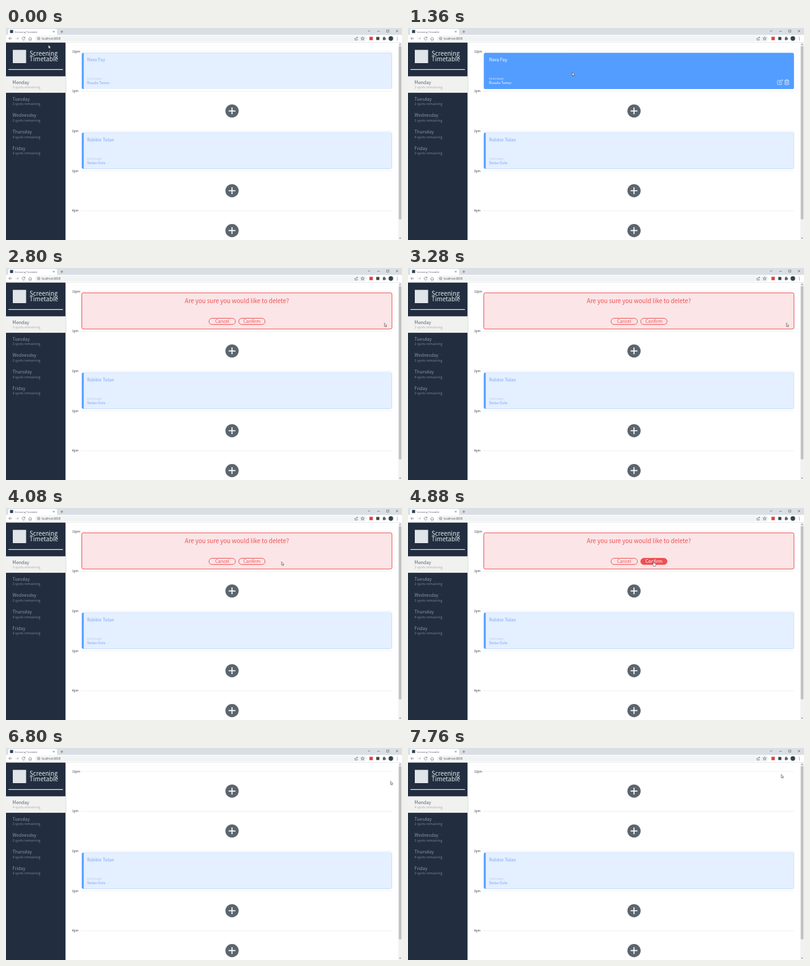
Write an HTML page that moves like this. It is 640 px wide and 344 px high and loops after 7.84 s.

```html
<!DOCTYPE html>
<html lang="en">
<head>
<meta charset="utf-8">
<title>Screening Timetable</title>
<style>
html, body { margin: 0; width: 100%; height: 100%; overflow: hidden; background: #fff; }
svg { display: block; width: 100vw; height: 100vh; }
text { font-family: "Noto Sans CJK JP", "Noto Sans CJK SC", "Noto Sans CJK", Lato, sans-serif; white-space: pre; }
.ui text { font-family: "Open Sans", "Noto Sans", sans-serif; }
.line { fill: none; stroke: #5f6368; stroke-width: .7; }
</style>
</head>
<body>
<svg id="stage" viewBox="0 0 640 344"></svg>
<script>
const LOOP = 7840, STEP = 80;
const CLICK_TRASH = 2800, CLICK_CONFIRM = 5120, DELETED = 6800;
const NAVY = '#222e3f', RED = '#ee5053';

const text = (x, y, size, fill, str, more = '') =>
  `<text x="${x}" y="${y}" font-size="${size}" fill="${fill}" ${more}>${str}</text>`;
const rect = (x, y, w, h, fill, more = '') =>
  `<rect x="${x}" y="${y}" width="${w}" height="${h}" fill="${fill}" ${more}/>`;
const path = (d, more = 'class="line"') => `<path d="${d}" ${more}/>`;
const group = (id, body) => `<g id="${id}">${body}</g>`;
const rowY = i => 37.9 + i * 64.7;
const centered = 'text-anchor="middle"';

function browser() {
  return `<g class="ui">` +
    rect(0, 0, 640, 11.5, '#dadfe5') +
    path('M1.5 11.5Q3.5 11.5 3.5 9V3.5Q3.5 1.5 5.5 1.5H80.5Q82.5 1.5 82.5 3.5V9Q82.5 11.5 84.5 11.5Z', 'fill="#fff"') +
    rect(6.5, 3.2, 5, 5, '#2c4450') +
    text(14, 7.6, 3.9, '#5a5d61', 'Screening Timetable') +
    path('M75.8 4.4l2.8 2.8m0-2.8l-2.8 2.8M88 6h4.4M90.2 3.8v4.4') +
    path('M585 4l1.8 1.8L588.6 4M600 5.3h4M615.3 3.3h3.4v3.4h-3.4zM630.2 3.2l3.6 3.6m0-3.6l-3.6 3.6') +
    rect(0, 11.5, 640, 12, '#fff') +
    rect(47, 12.4, 536, 9.6, '#f1f3f4', 'rx="4.8"') +
    path('M9.8 17H4.6M7 14.6L4.6 17L7 19.4') +
    path('M15.4 17h5.2m-2.4-2.4L20.6 17l-2.4 2.4', 'class="line" opacity=".5"') +
    path('M30.2 15.4a2.4 2.4 0 1 0 .6 2.2M30.8 14.2v1.8h-1.8') +
    path('M36.4 17.2L39 14.8l2.6 2.4M37.2 17v2.6h3.6V17') +
    path('M50.8 17a2 2 0 1 0 4 0a2 2 0 1 0-4 0M52.8 16.8v1.2', 'class="line" stroke-width=".5"') +
    text(57.5, 18.8, 4.6, '#515559', 'localhost:8000') +
    path('M564 16v3.4h4V18M565.4 17.6q.4-2.4 2.8-2.2m-1.2-1.2l1.4 1.2l-1.4 1.2') +
    path('M576.4 14.3l.8 1.9 2 .1-1.6 1.3.6 2-1.8-1.1-1.8 1.1.6-2-1.6-1.3 2-.1z') +
    rect(587.4, 14.3, 5.4, 5.4, '#e23b3b') +
    rect(598.4, 14.5, 5, 5, '#3c4043') +
    rect(609, 15.4, 4.2, 4.2, '#5f6368') +
    '<circle cx="611.1" cy="15.2" r="1.1" fill="#5f6368"/><circle cx="613.3" cy="17.5" r="1.1" fill="#5f6368"/>' +
    '<circle cx="622" cy="17" r="3.7" fill="#2f4548"/>' +
    [14.8, 17, 19.2].map(y => `<circle cx="632.4" cy="${y}" r=".6" fill="#5f6368"/>`).join('') +
    rect(0, 23, 640, .7, '#e0e2e5') + '</g>';
}

function sidebar() {
  const days = [['Monday', 3], ['Tuesday', 2], ['Wednesday', 2], ['Thursday', 4], ['Friday', 3]];
  return rect(96, 23.7, 1.4, 321, '#d2d6da') +
    rect(0, 23.7, 96, 321, NAVY) +
    rect(11, 35.5, 21.5, 21.5, '#dfe5e8') +
    text(38, 45.3, 9.8, '#e6e9ed', 'Screening', 'font-weight="300"') +
    text(38, 54.4, 9.8, '#e6e9ed', 'Timetable', 'font-weight="300"') +
    rect(4, 66.8, 88, 1.2, '#eef0f2') +
    rect(0, 78.4, 96.6, 26.7, '#f1f1f0') +
    days.map(([day, spots], i) => {
      const y = 91 + i * 26.7;
      return text(10.6, y, 7.15, i ? '#8496aa' : '#59636f', day) +
        text(10.6, y + 7.4, 5.45, i ? '#73859a' : '#b0aeab', `${spots} spots remaining`,
          `font-weight="300" ${i ? '' : 'id="spots"'}`);
    }).join('');
}

function hours() {
  return ['12pm', '1pm', '2pm', '3pm', '4pm'].map((hour, i) =>
    rect(121, rowY(i) - .4, 503, .8, '#ededed') +
    text(106.8, rowY(i) + 1.6, 4.85, '#333', hour, 'font-weight="500"')).join('');
}

function addButton(i) {
  const y = rowY(i) + 32;
  return `<circle cx="365.3" cy="${y}" r="10.7" fill="#5c656d"/>` +
    path(`M359.8 ${y}h11M365.3 ${y - 5.5}v11`, 'stroke="#fff" stroke-width="1.7"');
}

const card = (i, fill, more = '') => rect(122.5, rowY(i) + 2.4, 501.3, 58.7, fill, `rx="2.6" ${more}`);

function appointment(i, name, host, active) {
  const y = rowY(i), blue = '#529dff';
  const icons = path(
    `M602.5 ${y + 47.2}H598.2Q597.2 ${y + 47.2} 597.2 ${y + 48.2}V${y + 53}Q597.2 ${y + 54} 598.2 ${y + 54}H603Q604 ${y + 54} 604 ${y + 53}V${y + 51}` +
    `M600.2 ${y + 51.4}l.4-1.7l4-4l1.3 1.3l-4 4z` +
    `M608.4 ${y + 47.4}h7.6M610.8 ${y + 47.2}v-1.2h2.8v1.2M609.3 ${y + 47.5}v6.5h5.8v-6.5M611.2 ${y + 49}v3.5M613.2 ${y + 49}v3.5`,
    'fill="none" stroke="#e6f1ff" stroke-width=".8"');
  return card(i, blue) +
    (active ? icons : path(`M125.6 ${y + 2.4}H621.2Q623.8 ${y + 2.4} 623.8 ${y + 5}V${y + 58.5}Q623.8 ${y + 61.1} 621.2 ${y + 61.1}H125.6Z`, 'fill="#e4efff"')) +
    text(131, y + 16.4, 7.15, active ? '#fff' : '#7ba7fa', name) +
    text(131, y + 46.2, 4.5, active ? '#d3e6ff' : '#b4cbf8', 'Interviewer') +
    text(131, y + 53.3, 5.5, active ? '#fff' : '#6f9ff8', host);
}

function confirmCard() {
  const pill = (x, label, id = '') =>
    `<g ${id}>` + rect(x, 81.6, 42.6, 10.1, 'none', `rx="5.05" stroke="${RED}" stroke-width="1"`) +
    text(x + 21.3, 89.4, 7.3, RED, label, centered) + '</g>';
  return card(0, '#fbe5e7', `stroke="${RED}" stroke-width="1"`) +
    text(373.2, 57.2, 9.65, RED, 'Are you sure you would like to delete?', `${centered} font-weight="500"`) +
    pill(328.1, 'Cancel') + pill(376.1, 'Confirm', 'id="confirm"');
}

function deletingCard() {
  return card(0, NAVY) +
    '<circle cx="348.6" cy="69.6" r="7.5" fill="none" stroke="#4b5664" stroke-width="1.3"/>' +
    path('M341.1 69.6A7.5 7.5 0 0 1 348.6 62.1', 'id="arc" fill="none" stroke="#fff" stroke-width="1.4"') +
    text(367, 73.4, 9.5, '#fff', 'Deleting', 'font-weight="600"');
}

const scrollbar = () => rect(634, 23.7, 6, 321, '#f1f1f1') + rect(634.8, 29.5, 4.2, 281, '#c1c1c1') +
  path('M635.4 27.3l1.6-1.8l1.6 1.8zM635.4 340.3l1.6 1.8l1.6-1.8z', 'fill="#777"');

const pointer = 'stroke="#333" stroke-width=".55" stroke-linejoin="round" fill="#fff"';

const $ = id => document.getElementById(id);
$('stage').innerHTML = rect(0, 0, 640, 344, '#fff') + browser() + sidebar() + hours() +
  [1, 3, 4].map(addButton).join('') + appointment(2, 'Robbie Tolan', 'Stefan Gohr', false) +
  group('idle', appointment(0, 'Nora Fay', 'Rosalie Temur', false)) +
  group('hover', appointment(0, 'Nora Fay', 'Rosalie Temur', true)) +
  group('ask', confirmCard()) + group('busy', deletingCard()) + group('empty', addButton(0)) +
  scrollbar() +
  group('cursor',
    path('M0 0V5.6L1.3 4.5L2.2 6.5L3.1 6.1L2.2 4.1H4Z', `id="arrow" ${pointer}`) +
    path('M-.6 .3Q0-.4 .6 .3V2.8L3.2 3.3Q4 3.6 3.9 4.4L3.3 7.8H-.1L-2 5.1Q-2.2 4.2-1.3 4.4L-.6 5Z', `id="hand" ${pointer}`));

// Pointer stops: time, x, y
const stops = [
  [0, 68.6, 27.6], [240, 68.6, 27.6], [1360, 265.5, 72], [1840, 629, 90], [2080, 617.3, 87.5],
  [2400, 611.6, 89.3], [3360, 611.6, 89.3], [4400, 396.8, 86.5], [5280, 396.8, 86.5],
  [6160, 538.3, 68], [6960, 631, 52], [7760, 603.2, 42.8], [LOOP, 603.2, 42.8]
];

function pointerAt(t) {
  const i = stops.findIndex(s => s[0] > t);
  const [t0, x0, y0] = stops[i - 1], [t1, x1, y1] = stops[i];
  const u = (t - t0) / (t1 - t0), k = u * u * (3 - 2 * u);
  return [x0 + (x1 - x0) * k, y0 + (y1 - y0) * k];
}

function render(t) {
  const [x, y] = pointerAt(t);
  const over = (l, top, r, b) => x >= l && x <= r && y >= top && y <= b;
  const state = t < CLICK_TRASH ? (over(122.5, 40.3, 623.8, 99) ? 'hover' : 'idle')
    : t < CLICK_CONFIRM ? 'ask' : t < DELETED ? 'busy' : 'empty';
  const show = (id, on) => $(id).style.display = on ? '' : 'none';
  ['idle', 'hover', 'ask', 'busy', 'empty'].forEach(id => show(id, id === state));

  const onConfirm = state === 'ask' && over(376, 81.5, 419, 92);
  const [pill, label] = $('confirm').children;
  pill.setAttribute('fill', onConfirm ? RED : 'none');
  label.setAttribute('fill', onConfirm ? '#fff' : RED);

  const hand = onConfirm || state === 'ask' && over(328, 81.5, 371, 92) ||
    state === 'hover' && over(597, 83, 616, 93);
  show('hand', hand);
  show('arrow', !hand);
  $('cursor').setAttribute('transform', `translate(${x} ${y})`);
  $('arc').setAttribute('transform', `rotate(${(t - 6160) * .36} 348.6 69.6)`);
  $('spots').textContent = `${state === 'empty' ? 4 : 3} spots remaining`;
}

const start = performance.now();
function tick() {
  const t = (performance.now() - start) % LOOP;
  render(Math.floor(t / STEP) * STEP);
  requestAnimationFrame(tick);
}
tick();
</script>
</body>
</html>
```
